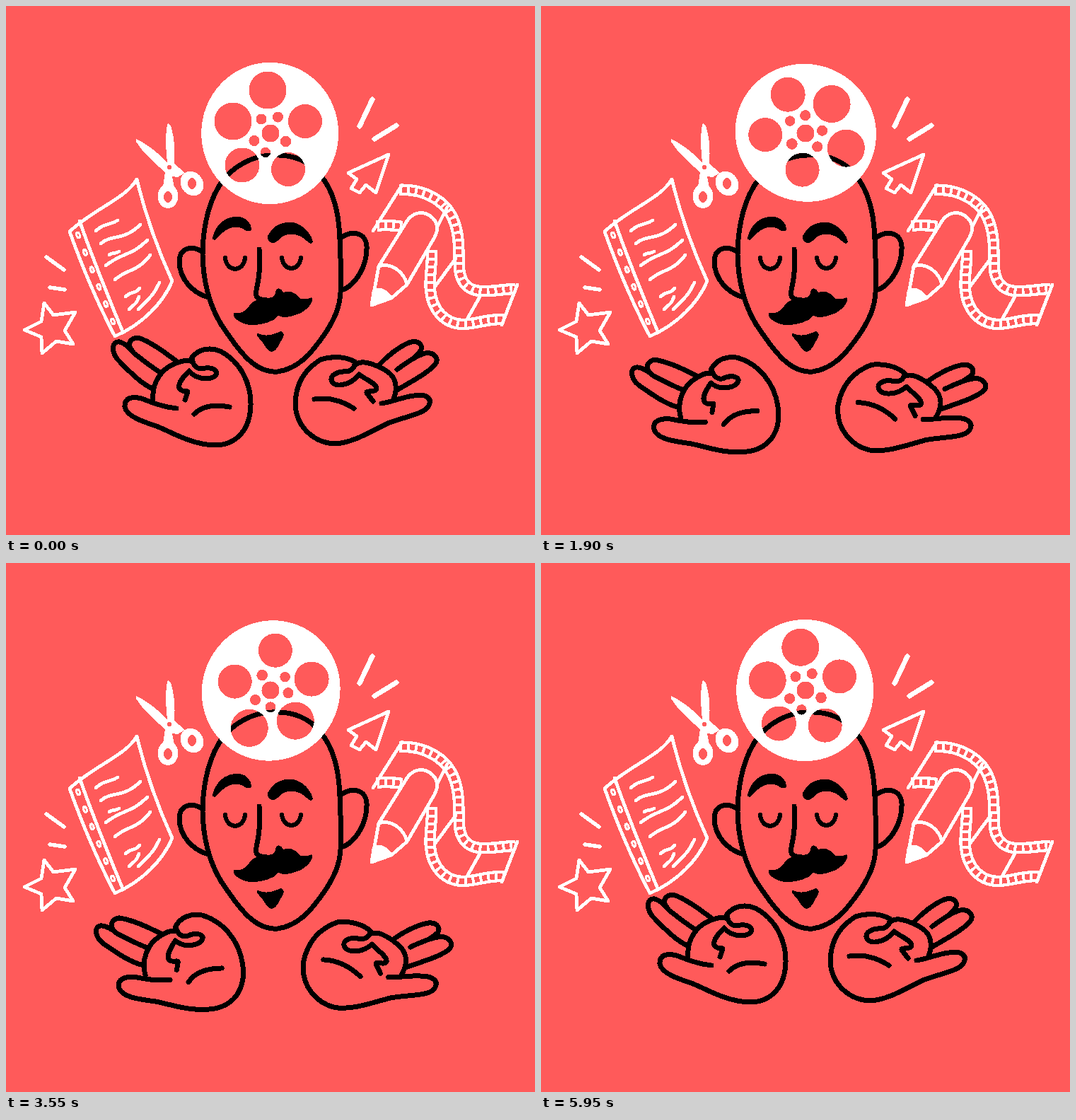
Animation, 748 px wide and 748 px high, one loop 6000 ms. Source, as an HTML page:

```html
<!DOCTYPE html>
<html lang="en">
<head>
<meta charset="utf-8">
<title>Film meditation</title>
<style>
html, body { margin: 0; width: 100%; height: 100%; overflow: hidden; background: #ff5a5a; }
svg { display: block; width: 100vw; height: 100vh; fill: none; stroke-linecap: round; stroke-linejoin: round; shape-rendering: crispEdges; }
.ink { stroke: #000; stroke-width: 7; }
.black { fill: #000; }
.chalk { stroke: #fff; stroke-width: 4.8; }
.white { fill: #fff; }
.red { fill: #ff5a5a; }
.strip { stroke-linecap: butt; }
</style>
</head>
<body>
<svg viewBox="0 0 748 748">
  <defs>
    <path id="upper" d="M556 260C590 258 622 275 633 303C642 325 640 350 641 372C643 392 655 403 672 403C690 404 705 400 720 400"/>
    <path id="lower" d="M602 345C603 365 598 385 600 402C603 430 620 449 645 450C665 450 680 442 704 443"/>
    <path id="side" d="M524 311C537 309 548 310 560 312"/>
  </defs>

  <!-- Head -->
  <g class="ink">
    <path d="M380 211C351 210 320 226 303 252C283 282 278 325 278 352C279 395 289 425 304 450C321 475 335 495 350 506C362 515 375 518 384 517C400 515 415 506 428 493C448 470 466 445 471 420C476 395 473 365 472 330C471 295 463 262 446 241C430 219 405 210 380 211Z"/>
    <path d="M277 347C262 338 245 342 245 362C246 385 262 405 286 412M472 329C485 317 509 318 510 340C511 365 496 395 474 402"/>
    <path stroke-width="6.2" d="M310 356C312 377 336 377 338 356M390 356C393 376 414 376 417 356"/>
    <path d="M358 344C360 365 358 385 354 402C352 412 357 416 366 415"/>
  </g>
  <g class="black">
    <path d="M292 327C298 304 316 296 331 298C341 300 348 309 347 317C343 320 339 318 335 315C325 309 309 314 298 329C296 332 291 331 292 327Z"/>
    <path d="M370 325C378 308 395 303 410 307C424 312 433 325 434 334C432 337 428 336 425 332C414 321 396 318 384 332C380 338 368 335 370 325Z"/>
    <path d="M322 434C335 436 340 430 347 420C355 413 366 414 376 412C381 409 381 405 382 401C386 397 390 401 392 405C402 401 410 406 415 413C421 416 428 414 432 412C437 417 425 432 412 436C400 441 392 441 385 438C378 447 360 452 345 451C330 449 319 440 322 434Z"/>
    <path d="M356 463C367 468 378 465 388 460C392 460 394 464 392 468C386 478 383 488 376 489C369 489 366 478 358 470C354 466 354 463 356 463Z"/>
  </g>

  <!-- Scissors -->
  <g class="white">
    <path d="M184 188C200 195 220 212 228 222C226 203 225 185 228 167C230 165 233 168 234 173C239 190 239 207 238 223L245 229L253 236L243 242L235 241L238 256L222 256L225 235C212 224 193 207 184 192Z"/>
    <circle class="red" cx="231" cy="228" r="3"/>
    <ellipse cx="229" cy="269" rx="14.5" ry="17"/>
    <ellipse cx="263" cy="251" rx="15.5" ry="18" transform="rotate(-35 263 251)"/>
    <ellipse class="red" cx="229" cy="270" rx="6" ry="8"/>
    <ellipse class="red" cx="263" cy="251" rx="6" ry="8"/>
  </g>

  <!-- Page, star, cursor and sparks -->
  <g class="chalk">
    <path d="M185 245C170 272 122 288 90 319C109 372 132 425 154 467C193 450 222 420 235 389C215 345 198 300 185 245ZM104 304C122 355 144 410 164 458"/>
    <path d="M127 318C140 306 146 311 158 303M134 336C150 322 166 333 190 309M146 352C150 348 155 351 160 347M141 367C165 348 177 354 200 331M154 387C170 372 187 376 204 352M169 411C178 402 183 408 189 399M174 429C180 421 184 424 188 411M187 429C200 415 208 411 217 391"/>
    <g id="punches" stroke-width="3"/>
    <path d="M54 420L67 437L98 433L83 459L95 478L71 474L51 491L50 468L26 458L50 446Z"/>
    <path d="M541 210L484 236L496 245L488 258L500 264L509 253L523 264Z"/>
    <path d="M57 355L82 373M62 398L83 401" stroke-width="5.5"/>
    <path d="M518 132L500 170M552 169L521 188" stroke-width="7"/>
  </g>

  <!-- Film strip -->
  <g class="strip">
    <g id="film"/>
    <path class="chalk" stroke-linecap="round" d="M560 253L519 318M723 394L701 451M624 284L608 316M636 357L607 396M670 411L652 443"/>
  </g>

  <!-- Pencil -->
  <g class="chalk">
    <path class="red" d="M527 368L567 304C575 292 589 289 600 297C611 305 612 315 606 327L567 394L545 413L517 423Z"/>
    <path d="M527 368C546 362 563 377 567 394"/>
    <path class="white" d="M517 423L520 404C528 397 538 404 544 412Z"/>
  </g>

  <!-- Hands -->
  <g id="left" class="ink">
    <path d="M263 497C272 485 288 482 303 488C330 502 347 532 346 565C345 600 325 621 295 621C262 620 235 603 215 595C195 588 171 581 168 567C167 553 179 552 192 555C207 561 222 567 241 569"/>
    <path d="M208 556C206 533 220 513 238 506C250 501 260 500 264 504M263 497C264 506 268 513 276 513C288 510 297 513 298 519C296 530 270 530 259 516C247 528 243 535 245 541C250 547 257 543 257 546L253 557"/>
    <path d="M207 541C189 533 170 512 158 500C148 488 150 473 161 475C171 478 177 486 181 491C195 502 208 512 218 518M178 487C170 477 177 469 187 469C205 475 225 490 242 503M266 577C277 566 295 563 316 567"/>
  </g>
  <g id="right" class="ink">
    <path d="M493 503C480 495 460 495 445 500C420 515 409 538 409 565C412 600 440 618 465 619C490 618 515 602 540 590C562 581 592 577 598 565C603 553 592 548 577 551C560 553 545 560 531 562"/>
    <path d="M548 556C554 540 552 525 538 516C525 508 505 500 496 506M493 503C494 511 489 516 481 517C469 516 459 522 460 529C463 541 487 537 499 521C512 530 524 534 524 541C522 547 509 543 510 547L519 559"/>
    <path d="M527 508C538 496 555 482 570 476C580 472 590 477 587 486C584 491 581 494 577 497M553 514C565 505 580 494 593 491C604 489 612 497 608 505C600 517 575 530 553 543M436 556C455 553 475 558 492 569"/>
  </g>

  <path id="reel" class="white" fill-rule="evenodd"/>
</svg>
<script>
const $ = id => document.getElementById(id);

// Each film edge is a wide line, hollowed and crossed by ticks
const layers = [['#fff', 16.5, ''], ['#ff5a5a', 8, ''], ['#fff', 15, '4 7']];
$('film').innerHTML = ['upper', 'lower', 'side'].map(id =>
  layers.map(([color, width, dash]) =>
    `<use href="#${id}" stroke="${color}" stroke-width="${width}" stroke-dasharray="${dash}"/>`
  ).join('')).join('');

for (let i = 0; i < 6; i++) {
  const x = 102 + i * 9.8, y = 324 + i * 24.4;
  $('punches').innerHTML += `<ellipse cx="${x}" cy="${y}" rx="2.2" ry="4" transform="rotate(-20 ${x} ${y})"/>`;
}

const oval = (x, y, rx, ry = rx) =>
  `M${x - rx} ${y}a${rx} ${ry} 0 1 0 ${2 * rx} 0a${rx} ${ry} 0 1 0 ${-2 * rx} 0`;
const holes = [
  [370, 119, 26.5], [423, 163, 24], [399, 231, 24], [334, 225, 24.5], [321, 163, 26.5], [374, 180, 12.5],
  [361, 160, 7.5], [384.5, 157, 7.5], [395.5, 191.5, 7.8], [367, 207, 7.2], [351, 190.5, 7.5]
];
$('reel').setAttribute('d', oval(373.2, 180, 97, 100.2) + holes.map(h => oval(...h)).join(''));

const ramp = (t, start) => {
  const p = Math.min(1, Math.max(0, (t - start) / 900));
  return p * p * (3 - 2 * p);
};
const turn = (id, angle, x, y) => $(id).setAttribute('transform', `rotate(${angle} ${x} ${y})`);

const begin = performance.now();
function draw(now) {
  const t = Math.floor(Math.max(0, now - begin) % 6000 / 50) * 50;
  const drop = ramp(t, 1120) - ramp(t, 4030);
  turn('reel', t * 0.06, 374, 180);
  turn('left', -11.2 * drop, 341, 625);
  turn('right', 11.5 * drop, 418, 622);
  requestAnimationFrame(draw);
}
draw(begin);
</script>
</body>
</html>
```
